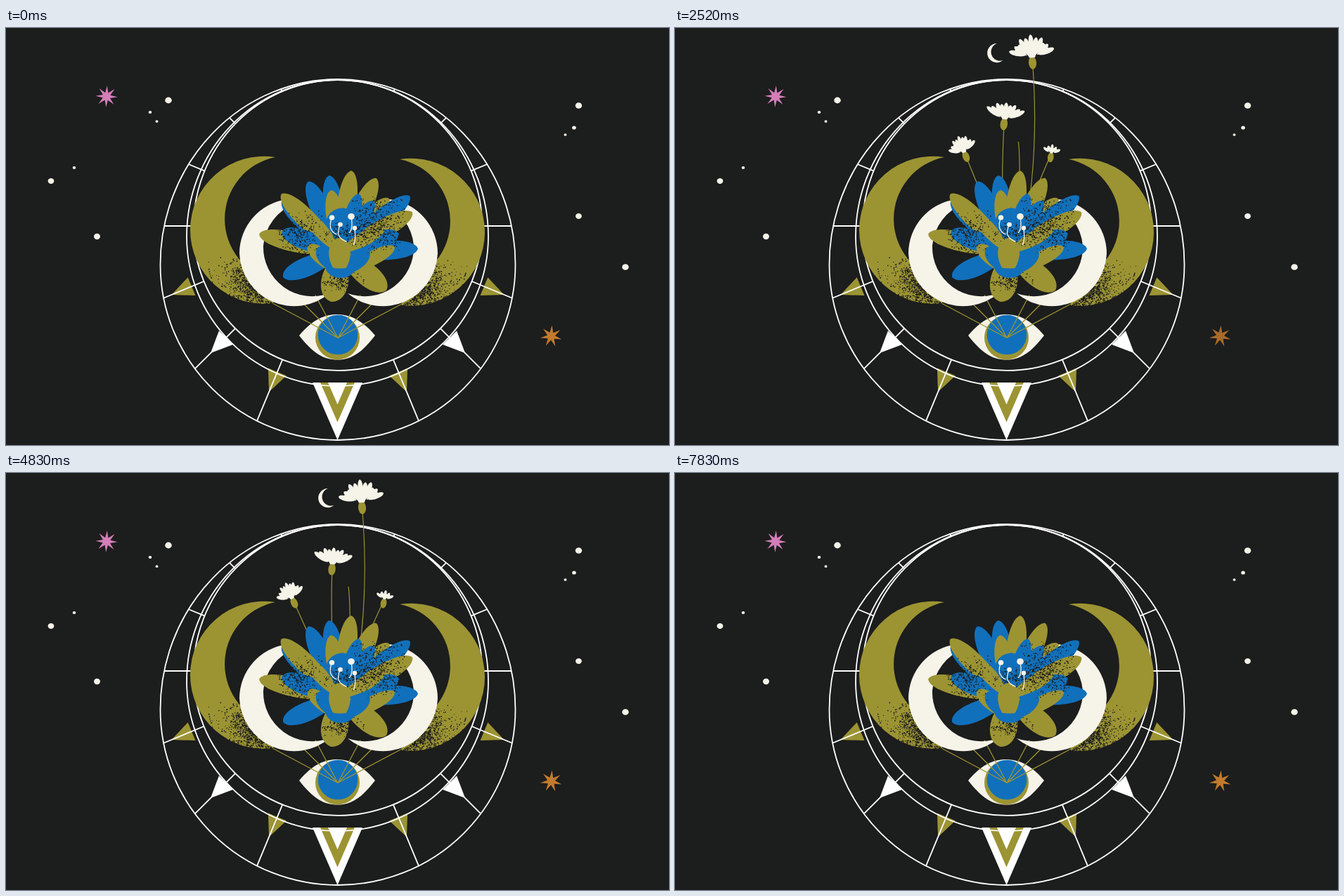
Write an HTML page that moves like this. It is 943 px wide and 594 px high and loops after 8100 ms.

```html
<!DOCTYPE html>
<html lang="en">
<head>
<meta charset="utf-8">
<title>Lotus and eye</title>
<style>
html, body { margin: 0; width: 100%; height: 100%; overflow: hidden; background: #1c1d1d; }
svg { display: block; width: 100vw; height: 100vh; }
</style>
</head>
<body>
<svg id="stage" viewBox="0 0 943 594"></svg>
<script>
const LOOP = 8100;
const DARK = '#1c1d1d', CREAM = '#f6f3e9', OLIVE = '#9c9433', BLUE = '#1170bb', WHITE = '#fff';
const stage = document.getElementById('stage');

function el(tag, attrs, parent = stage) {
  const node = document.createElementNS('http://www.w3.org/2000/svg', tag);
  for (const key in attrs) node.setAttribute(key, attrs[key]);
  parent.appendChild(node);
  return node;
}
const group = (attrs = {}, parent = stage) => el('g', attrs, parent);
const fill = (d, color, parent) => el('path', { d, fill: color }, parent);
const line = (d, color, width, parent) =>
  el('path', { d, fill: 'none', stroke: color, 'stroke-width': width }, parent);
const oval = (cx, cy, rx, ry, color, parent) => el('ellipse', { cx, cy, rx, ry, fill: color }, parent);
const polar = ([x, y], deg, r) =>
  [x + r * Math.cos(deg * Math.PI / 180), y + r * Math.sin(deg * Math.PI / 180)];

let seed = 7;
function random() {
  seed = (seed * 16807) % 2147483647;
  return seed / 2147483647;
}
const spread = () => random() + random() - 1;
function speck(x, y) {
  const s = (0.7 + random() * 1.1).toFixed(1);
  return `M${x.toFixed(1)} ${y.toFixed(1)}h${s}v${s}h-${s}z`;
}

// Leaf from base to a rounded tip
function petal([bx, by], [tx, ty], w, color, parent) {
  const dx = tx - bx, dy = ty - by, k = w * 0.68 / Math.hypot(dx, dy);
  const at = (along, side) => `${bx + dx * along - dy * k * side} ${by + dy * along + dx * k * side}`;
  fill(`M${bx} ${by}C${at(0.3, 1)} ${at(0.95, 1)} ${tx} ${ty}C${at(0.95, -1)} ${at(0.3, -1)} ${bx} ${by}Z`, color, parent);
}

el('rect', { width: 943, height: 594, fill: DARK });

// Sky: place, size and the moments of twinkling
const twinkles = [];
function dot(x, y, r, ...starts) {
  twinkles.push({ node: oval(x, y, r, r * 0.92, CREAM), starts, length: 360 });
}
dot(64, 218, 4.4, 120, 3560, 6390);
dot(97, 199, 2.3, 5880);
dot(129.5, 297, 4.5, 1900, 7470);
dot(231, 103, 4.8, 240);
dot(205, 120, 2.3);
dot(214.5, 133, 2, 6510);
dot(814.5, 110.5, 4.7, 7470);
dot(808, 142, 2.8, 3700);
dot(795.5, 152, 2, 360);
dot(814.5, 268, 4.4, 2720, 6390);
dot(881, 340.5, 4.7, 1050, 4400);

function star(center, points, turn, color, ...starts) {
  const d = [];
  for (let i = 0; i < points * 2; i++) d.push(polar(center, turn + i * 180 / points, i % 2 ? 5.6 : 15.6));
  twinkles.push({ node: fill(`M${d.join('L')}Z`, color), starts, length: 600 });
}
star([143, 97.5], 8, 3, '#d57db9', 1050, 2720, 4220);
star([775.5, 439], 7, -86, '#c27a2c', 1950, 3620, 5290);

// Dial: rings are two half ellipses, spokes and points follow from one hub
const HUB = [472, 282];
const rings = [
  { cx: 472, cy: 337, rx: 252.5, top: 73, bottom: 587 },
  { cx: 471.5, cy: 297, rx: 214.5, top: 74, bottom: 510 },
  { cx: 472, cy: 285, rx: 205.5, top: 74, bottom: 488 }
];
function rim({ cx, cy, rx, top, bottom }, deg) {
  for (let r = 150; ; r += 0.5) {
    const [x, y] = polar(HUB, deg, r);
    const ry = y < cy ? cy - top : bottom - cy;
    if (Math.hypot((x - cx) / rx, (y - cy) / ry) >= 1) return [x, y];
  }
}
for (let i = 1; i < 8; i++) {
  if (i === 4) continue;
  const a = i * 22.5;
  const side = Math.atan2(14, 225) * 180 / Math.PI;
  const corners = [polar(HUB, a - side, 225.5), polar(HUB, a, 256), polar(HUB, a + side, 225.5)];
  if (i < 7 || i === 7) fill(`M${corners.join('L')}Z`, i % 2 ? OLIVE : WHITE);
}
[1, 0.69, 0.38].forEach((s, i) =>
  fill(`M${471.5 - 35.5 * s} 505h${71 * s}l${-35.5 * s} ${82 * s}Z`, i % 2 ? OLIVE : WHITE));
for (const { cx, cy, rx, top, bottom } of rings)
  line(`M${cx - rx} ${cy}A${rx} ${cy - top} 0 0 1 ${cx + rx} ${cy}A${rx} ${bottom - cy} 0 0 1 ${cx - rx} ${cy}Z`, WHITE, 1.8);
for (let a = 0; a < 360; a += 22.5)
  if (a % 180 !== 90) line(`M${rim(rings[2], a)}L${rim(rings[0], a)}`, WHITE, 1.8);

// Eye
const eye = group();
fill('M417 438C438 413 455 408 471 408S505 414 525 438C505 464 490 472.5 471 472.5S437 464 417 438Z', CREAM, eye);
oval(471.5, 441, 31.5, 31.5, OLIVE, eye);
oval(472, 437, 28.3, 28.3, BLUE, eye);
for (const side of [-1, 1])
  line(`M472 441.5l${92 * side} -49M472 441.5l${48 * side} -48M472 441.5l${32 * side} -61`, OLIVE, 1.3);

// Crescents, each drawn once and mirrored
function grain() {
  let d = '';
  for (let i = 0; i < 800; i++) {
    const r = 76 + Math.min(48, -Math.log(1 - random()) * 15);
    const [x, y] = polar([410, 321], 141 + 38 * spread(), r);
    if (y < 393) d += speck(x, y);
  }
  return d;
}
for (const transform of ['', 'translate(943 3) scale(-1 1)']) {
  const side = group({ transform });
  fill('M383 184A105 105 0 0 0 262 288A105 105 0 0 0 380 392L383 360A89.8 89.8 0 0 1 383 184Z', OLIVE, side);
  fill(grain(), DARK, side);
}
for (const transform of ['', 'translate(946 0) scale(-1 1)'])
  fill('M400 244A78 78 0 0 0 332 321A78 78 0 0 0 460 378A70 70 0 0 1 366 310A70 70 0 0 1 412 250Z',
    CREAM, group({ transform }));

// Wild flowers: stem from head to root, a fringe of fingers w wide and h high
const clip = el('clipPath', { id: 'above' }, el('defs', {}));
el('rect', { width: 943, height: 320 }, clip);
const garden = group({ 'clip-path': 'url(#above)' });

function head([x, y], w, h, droop, turn, parent) {
  const g = group({ transform: `translate(${x} ${y}) rotate(${turn})` }, parent);
  const ry = 6 + w / 10;
  oval(0, ry * 0.8, ry * 0.6, ry, OLIVE, g);
  const n = w > 15 ? 8 : 4;
  for (let i = 0; i <= n; i++) {
    const s = i / n * 2 - 1;
    const short = i % 2 ? h * 0.1 : 0;
    petal([s * w * 0.3, -h * 0.1], [s * w, -h + droop * s * s + short], w * 0.16 + 2, CREAM, g);
  }
  fill(`M${-w * 0.13} 0Q${-w * 0.2} ${-h * 0.3} ${-w * 0.8} ${-h * 0.3}L${-w * 0.55} ${-h * 0.6}` +
    `H${w * 0.55}L${w * 0.8} ${-h * 0.3}Q${w * 0.2} ${-h * 0.3} ${w * 0.13} 0Z`, CREAM, g);
}

// sway: lean in degrees at each of the SWAY_TIMES
const SWAY_TIMES = [1770, 3330, 4830, 5940];
const flowers = [
  { top: [487, 162], bend: [491, 190], root: [488, 300], sway: [0, 1.2, 0, 0] },
  { top: [505, 42], bend: [518, 180], root: [495, 300], sway: [0, 1.4, 0.2, -0.3], shape: [32, 33, 22, -5] },
  { top: [466, 130], bend: [462, 200], root: [467, 300], sway: [0, 1.9, -0.6, 2.3], shape: [27, 24, 9, 6], late: 35 },
  { top: [410, 178], bend: [430, 225], root: [458, 293], sway: [0, 1.7, -1.3, 0], shape: [20, 25, 14, -22] },
  { top: [534, 178], bend: [515, 225], root: [490, 285], sway: [0, 1.3, 2.2, -1.2], shape: [12, 13, 6, 8] }
];
for (const f of flowers) {
  f.node = group({}, garden);
  line(`M${f.top}Q${f.bend} ${f.root}`, OLIVE, 1.2, f.node);
  if (f.shape) head(f.top, ...f.shape, f.node);
}

const moon = fill('M458 22A13.6 13.6 0 1 0 466.5 46A12.6 12.6 0 0 1 458 22Z', CREAM);

// Lotus: fans of equal petals, back to front
const HEART = [475, 320], CUP = [478, 350];
function fan(from, color, length, width, ...angles) {
  for (const a of angles) petal(from, polar(from, a, length), width, color);
}
fan(HEART, BLUE, 111, 27, -138, -114, -98, -3);
fan(HEART, OLIVE, 104, 26, -48);
fan(HEART, BLUE, 128, 27, -39);
fan(HEART, OLIVE, 118, 27, -167, -135, -82, -64, -29);
fan(HEART, BLUE, 88, 27, -160, -18, 157);
fan(HEART, OLIVE, 85, 32, 39);
fan(HEART, OLIVE, 71, 38, 100);
fan(HEART, OLIVE, 90, 24, -98);
fan(HEART, BLUE, 88, 22, -72, -57);
fan(HEART, BLUE, 64, 46, -86);
fan(HEART, OLIVE, 74, 20, -131, -30);
fan(CUP, OLIVE, 84, 20, -27);
fan(CUP, OLIVE, 63, 22, -140);
fan(CUP, BLUE, 51, 24, -133, -42);

function cloud(x, y, w, h, count) {
  let d = '';
  for (let i = 0; i < count; i++) d += speck(x + spread() * w, y + spread() * h);
  fill(d, DARK);
}
cloud(416, 293, 34, 34, 340);
cloud(528, 280, 42, 42, 560);
cloud(484, 293, 36, 18, 200);
cloud(478, 361, 32, 16, 200);

petal([474.5, 352], [474.5, 299], 30, OLIVE);
fill('M453 338Q475 347 498 338Q495 356 475 356Q457 355 453 338Z', BLUE);

function stamen(x, y, r, bend) {
  line(`M${x} ${y}q${-bend} 18 ${bend} ${26 - r / 2}`, CREAM, 1.3);
  oval(x, y, r, r * 0.95, CREAM);
}
stamen(463.5, 270, 3.8, 7);
stamen(475.5, 280, 3.4, 9);
stamen(491, 268.5, 4.8, -3);
stamen(496, 285, 3.3, -2);

// Motion
const clamp = x => Math.max(0, Math.min(1, x));
const backOut = x => 1 + 1.7 * (x - 1) ** 3 + 0.7 * (x - 1) ** 2;
const pulse = (t, start, length) => Math.sin(Math.PI * clamp((t - start) / length));
const pulses = (t, starts, length) => Math.max(0, ...starts.map(s => pulse(t, s, length)));

function lean(t, values) {
  let angle = values[0];
  for (let i = 1; i < values.length; i++) {
    const u = clamp((t - SWAY_TIMES[i - 1]) / (SWAY_TIMES[i] - SWAY_TIMES[i - 1]));
    angle += (values[i] - values[i - 1]) * (1 - Math.cos(Math.PI * u)) / 2;
  }
  return angle;
}

function draw(t) {
  for (const { node, starts, length } of twinkles)
    node.setAttribute('opacity', 1 - pulses(t, starts, length));

  const shut = 0.94 * pulses(t, [120, 5220], 600);
  eye.setAttribute('transform', `translate(0 ${440 * shut}) scale(1 ${1 - shut})`);

  for (const { node, top, root, sway, late = 0 } of flowers) {
    const rise = backOut(clamp((t - 1005) / 740));
    const sink = clamp((t - 5595 - late) / 555) ** 3;
    const down = 1 - rise + sink;
    node.setAttribute('visibility', t > 1005 && sink < 1 ? 'visible' : 'hidden');
    node.setAttribute('transform',
      `translate(${(root[0] - top[0]) * down} ${(root[1] - top[1]) * down}) rotate(${lean(t, sway)} ${root})`);
  }

  const enter = clamp((t - 1890) / 400), leave = clamp((t - 5880) / 150);
  moon.setAttribute('opacity', enter * (1 - clamp((t - 5945) / 80)));
  moon.setAttribute('transform', `translate(0 ${10 * (1 - enter) ** 3 - 11 * leave ** 2})`);
}

const start = performance.now();
function tick() {
  draw((performance.now() - start) % LOOP);
  requestAnimationFrame(tick);
}
draw(0);
requestAnimationFrame(tick);
</script>
</body>
</html>
```
